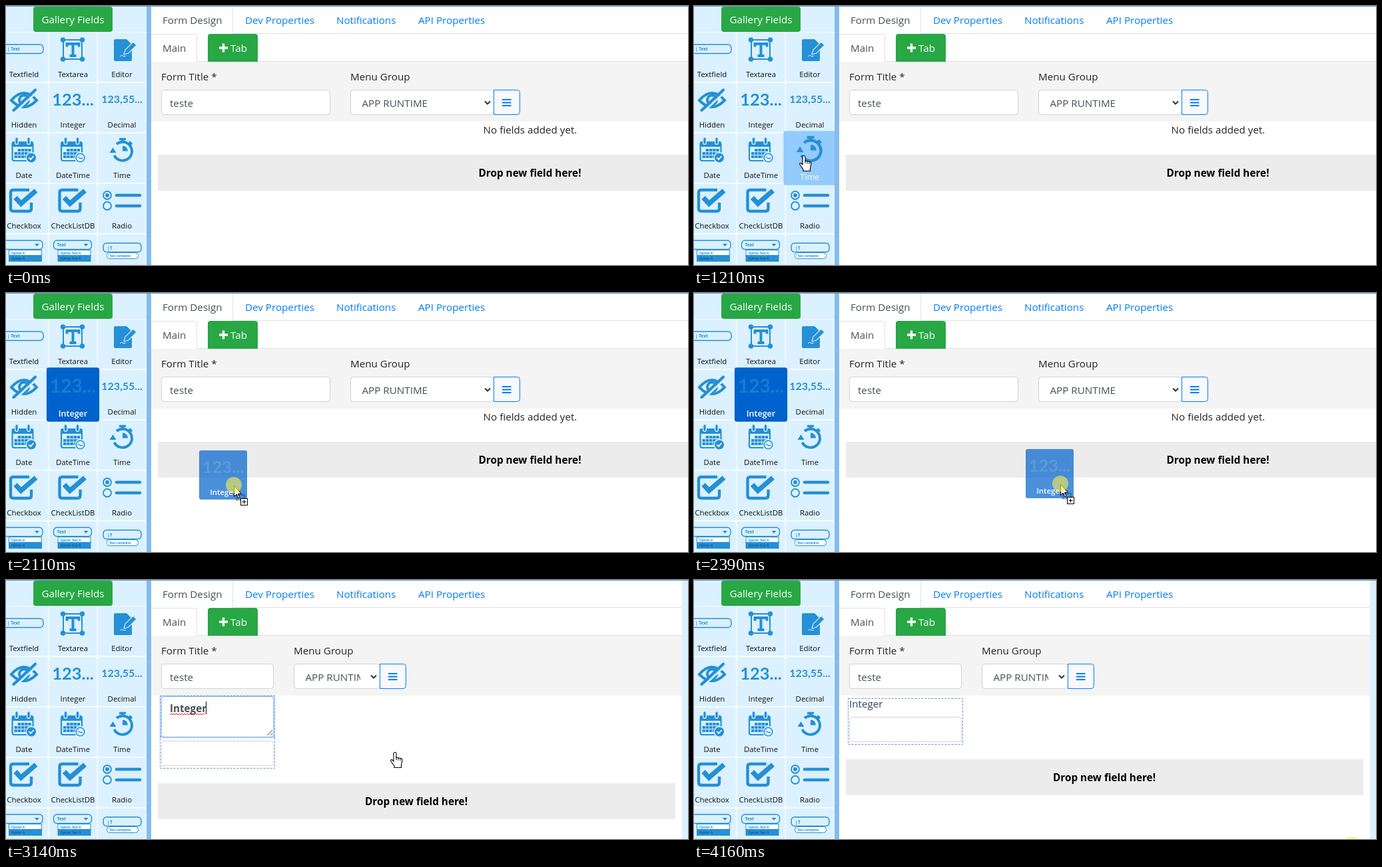
These frames come from a looping animation (1024x390 px, 4290 ms). An HTML page:

```html
<!DOCTYPE html>
<html lang="en">
<head>
<meta charset="utf-8">
<title>Form designer</title>
<style>
html, body { margin: 0; height: 100%; overflow: hidden; background: #fff; }
svg { display: block; width: 100vw; height: 100vh; font-family: "Open Sans", "Noto Sans", sans-serif; }
</style>
</head>
<body>
<svg id="stage" viewBox="0 0 1024 390"></svg>
<script>
const LOOP = 4290, BLUE = '#2590d6', GREEN = '#28a745', LINK = '#007bff', INK = '#212529', GREY = '#495057', SKY = '#dbf1ff';
const stage = document.getElementById('stage');

const rect = (x, y, w, h, fill, more = '') =>
  `<rect x="${x}" y="${y}" width="${w}" height="${h}" fill="${fill}" ${more}/>`;
const text = (x, y, s, fill = INK, size = 15.2, more = '') =>
  `<text x="${x}" y="${y}" fill="${fill}" font-size="${size}" ${more}>${s}</text>`;
const path = (d, stroke, width = 1, fill = 'none', more = '') =>
  `<path d="${d}" stroke="${stroke}" stroke-width="${width}" fill="${fill}" ${more}/>`;
const disc = (x, y, r, fill, more = '') => `<circle cx="${x}" cy="${y}" r="${r}" fill="${fill}" ${more}/>`;
const move = (x, y, body) => `<g transform="translate(${x} ${y})">${body}</g>`;
const box = (x, y, w, h, stroke = '#ced4da', fill = '#fff', more = 'rx="4"') =>
  rect(x + .5, y + .5, w - 1, h - 1, fill, `stroke="${stroke}" ${more}`);
const MID = 'text-anchor="middle"', BOLD = 'font-weight="700"', ROUND = 'stroke-linecap="round"';

// Icons are drawn relative to the top left corner of a 72 x 74 tile
const pill = (x, y, w) => rect(x, y, w, 13.5, 'none', `rx="5" stroke="${BLUE}" stroke-width="1.4"`);
const tiny = (x, y, s, fill = BLUE, size = 4.6) => text(x, y, s, fill, size, BOLD);
const digits = (s, y, size) => text(36, y, s, BLUE, size, `${MID} ${BOLD} font-family="Lato, sans-serif"`);

function calendar(badge) {
  let s = rect(18.5, 13, 31, 28, 'none', `rx="3" stroke="${BLUE}" stroke-width="2.2"`) +
    rect(18, 12, 32, 8, BLUE, 'rx="2"') +
    path('M25 8V14M43 8V14', SKY, 6, 'none', ROUND) + path('M25 8V14M43 8V14', BLUE, 3.4, 'none', ROUND);
  for (let i = 1; i < 14; i++) s += rect(21.5 + i % 5 * 5.2, 23 + (i / 5 | 0) * 5, 4.4, 4, BLUE);
  return s + disc(47, 36.500, 8.5, SKY) + (badge === 'check'
    ? disc(47, 36.500, 7, BLUE) + path('M43.500 36.500l2.500 2.500 4.500-5', '#fff', 1.8)
    : disc(47, 36.500, 6.3, SKY, `stroke="${BLUE}" stroke-width="1.6"`) + path('M43.500 35.500l4 2h3', BLUE, 1.3));
}
const checkbox = () =>
  path('M44 9H20Q16 9 16 13V37Q16 41 20 41H43Q47 41 47 37V28', BLUE, 4.4) +
  path('M23 20.500l8.500 9L54 10', BLUE, 7.5);
const option = y => disc(14, y, 6, 'none', `stroke="${BLUE}" stroke-width="1.8"`) +
  path(`M28 ${y}H63`, BLUE, 4.6, 'none', ROUND);
const dropdown = (x, w, label, item) => pill(x, 9, w) + tiny(12, 18, label, BLUE, 6.5) +
  path('M52 14h7l-3.500 4z', 'none', 0, BLUE) + box(13, 23, 50, 10, BLUE, '#fff', '') +
  rect(13, 31, 50, 10, BLUE) + tiny(17, 29.5, item) + tiny(17, 38, item, '#135a94');

const TILES = [
  ['Textfield', () => pill(-3, 18, 68) + tiny(11, 27, '| Text', BLUE, 6.5)],
  ['Textarea', () => rect(21.5, 11, 28, 29, 'none', `stroke="${BLUE}" stroke-width="2"`) +
    [[21, 11], [50, 11], [21, 40], [50, 40]].map(p => disc(...p, 3.8, BLUE)).join('') +
    path('M27 21.500V17H45V21.500M36 17V35M31 35H41', BLUE, 4)],
  ['Editor', () => path('M26 10H43L51 18V41Q51 43 49 43H26Q24 43 24 41V12Q24 10 26 10Z', 'none', 0, BLUE) +
    path('M39 33l2-7L53 14l5 5L46 31Z', SKY, 1.1, BLUE) + path('M33 36l3-2 2 2 4-1', SKY, 1)],
  ['Hidden', () => path('M17 26Q36 4 55 26Q36 46 17 26Z', BLUE, 4) +
    disc(36, 25.5, 7, 'none', `stroke="${BLUE}" stroke-width="4"`) +
    path('M23 43.500L56 13', SKY, 3) + path('M20.500 41L53 10.500', BLUE, 4.4, 'none', ROUND)],
  ['Integer', () => digits('123...', 34, 25.5)],
  ['Decimal', () => digits('123,55...', 30, 16)],
  ['Date', () => calendar('check')],
  ['DateTime', () => calendar('clock')],
  ['Time', () => path('M24.500 33A14 14 0 1 0 28 16', BLUE, 4) + path('M17.500 29h10l-5-8z', 'none', 0, BLUE) +
    path('M32 8.500H42M37 8V13M47 12.500l4 4', BLUE, 3.6) + path('M37 26.500V18.500A8 8 0 0 1 45 26.500Z', 'none', 0, BLUE)],
  ['Checkbox', checkbox],
  ['CheckListDB', checkbox],
  ['Radio', () => option(17) + option(33) + disc(14, 17, 3, BLUE)],
  ['', () => dropdown(-3, 67, '', 'Option A')],
  ['', () => dropdown(7, 57, 'Text', 'Option Text A')],
  ['', () => pill(8, 13, 57) + tiny(14, 23, '|T', BLUE, 7) + box(13, 27, 48, 10, BLUE, '#fff') + tiny(17, 34, 'Text complete')]
];
const FILL = { idle: SKY, hover: '#93cbfd', active: '#0062cc' };

function tileBody(i, mode) {
  const [name, icon] = TILES[i];
  return rect(0, 0, 72, 74, FILL[mode], 'rx="3"') +
    `<g opacity="${mode === 'active' ? .6 : 1}">${icon()}</g>` +
    text(36, 67, name, mode === 'idle' ? '#111' : '#fff', 11.4, MID + (mode === 'active' ? ' font-weight="600"' : ''));
}
function tile(i, mode = 'idle') {
  const x = -9 + i % 3 * 73.5, y = 40 + (i / 3 | 0) * 76;
  return move(x, y, mode === 'idle' ? tileBody(i, mode)
    : `<g transform="translate(-3.6 -3.7) scale(1.1)">${tileBody(i, mode)}</g>`);
}

function sidebar(hot, mode) {
  let s = rect(0, 0, 211, 390, SKY) + rect(0, 39, 211, 351, '#f6fcff');
  TILES.forEach((_, i) => { if (i !== hot) s += tile(i); });
  if (hot >= 0) s += tile(hot, mode);
  return s + rect(211, 0, 7, 390, '#85bcea') +
    rect(41, 1, 119, 38, GREEN, 'rx="4"') + text(100.5, 26, 'Gallery Fields', '#fff', 15.2, MID);
}

function header(narrow) {
  const right = narrow ? 1015 : 1024, inputW = narrow ? 169 : 254;
  const menu = narrow ? 432 : 517, selW = narrow ? 130 : 216, end = menu + selW - 1;
  return rect(218, 84, right - 218, 90, '#f4f4f4') +
    path(`M340.500 1V41.500H${right}M286.500 83.500V45Q286.500 42.500 283 42.500H218M286.500 83.500H${right}`, '#dee2e6') +
    text(235, 27, 'Form Design', GREY) + text(359, 27, 'Dev Properties', LINK) +
    text(496, 27, 'Notifications', LINK) + text(619, 27, 'API Properties', LINK) +
    text(235, 69, 'Main', GREY) +
    path('M303 84V46Q303 42 307 42H374Q378 42 378 46V84Z', 'none', 0, GREEN) +
    path('M320 63H333M326.500 56.500V69.500', '#fff', 3.4) + text(337, 69, 'Tab', '#fff') +
    text(233, 112, 'Form Title *') + box(233, 126, inputW, 38) + text(246, 152, 'teste', GREY) +
    text(menu, 112, 'Menu Group') + box(menu, 126, selW, 38) +
    `<clipPath id="sel"><rect x="${menu}" y="126" width="${selW - 30}" height="38"/></clipPath>` +
    text(menu + 17.5, 152, 'APP RUNTIME', GREY, 15.2, 'clip-path="url(#sel)"') +
    path(`M${end - 13} 143.500l4 4 4-4`, '#333', 2) +
    path(`M${end + .5} 126.500h35q4 0 4 4v29q0 4-4 4h-35z`, LINK, 1, '#f8f9fa') +
    path([141, 145.5, 150].map(y => `M${end + 13} ${y}h13.500`).join(''), LINK, 2);
}

const dropBar = (y, right, mid) => rect(228, y, right - 228, 54, '#ececec') +
  text(mid, y + 33, 'Drop new field here!', '#000', 15.3, `${MID} ${BOLD}`);
const dashed = (y, h) => box(231, y, 173, h, '#6c8fd0', 'none', 'stroke-dasharray="3 2"');

function editing() {
  return rect(231, 173.5, 173, 65, '#cfe5ff', 'rx="4"') + box(233, 175, 169, 62, '#80bdff') +
    dashed(174, 110) + path('M231 236.500H404', '#6c9fd8', 1, 'none', 'stroke-dasharray="3 2"') +
    text(246, 199, 'Integer', GREY, 15.2, BOLD) + path('M246 203' + 'l2-2 2 2'.repeat(13), '#e22', 1) +
    path('M300.500 183V202', '#000') + path('M392 234l8-8M397 234l3-3', '#555') +
    box(233, 242, 169, 38) + dropBar(306, 1005, 616);
}
const added = () => box(233, 206, 169, 38) + dashed(178, 70) +
  text(233, 192, 'Integer', '#35425e') + dropBar(270, 1005, 616);

// Pointer: [ms, x, y]
const ROUTE = [
  [380, 729, 315], [588, 460, 213], [657, 390, 193], [727, 338, 185], [796, 290, 186], [865, 223, 204],
  [1000, 185, 228], [1212, 165, 225], [1420, 100, 163], [1490, 99, 159], [1690, 99, 159],
  [1830, 117, 169], [1905, 160, 195], [1974, 226, 237], [2043, 283, 268], [2113, 342, 290],
  [2182, 405, 302], [2251, 460, 303], [2320, 510, 298], [2390, 550, 288], [2460, 578, 274],
  [2529, 592, 266], [2605, 592, 264], [2870, 584, 259], [3430, 584, 259], [3500, 640, 300], [3570, 817, 371]
];
function pointer(t) {
  const i = ROUTE.findIndex(k => k[0] > t);
  if (i < 1) return ROUTE[i ? ROUTE.length - 1 : 0].slice(1);
  const [a, b] = [ROUTE[i - 1], ROUTE[i]], p = (t - a[0]) / (b[0] - a[0]);
  return [1, 2].map(j => Math.round(a[j] + (b[j] - a[j]) * p));
}
const sample = t => 380 + Math.floor((t - 374) / 69.3) * 69.3;

const arrow = path('M.5.500V16.500L4.200 13L7 19L9.200 18L6.500 12.300H11.500Z', '#000', 1, '#fff');
const hand = path('M-2 2Q-2 .5 0 .5T2 2V8L9 9.500Q11 10 11 13L9.500 19V23.500H-1V21L-6 14Q-7 11 -4.500 11.500L-2 14Z', '#000', 1.1, '#fff') +
  path('M2 7V12M5 9V12.500M8 10V13', '#000', 1);
const copyBadge = rect(4, 14, 12, 8, 'none', 'stroke="#000" stroke-dasharray="1 1"') +
  box(10, 19, 11, 11, '#000', '#fff', '') + path('M12.500 24.500h6M15.500 21.500v6', '#000');
const press = (x, y) => disc(x, y, 12, '#ffec4a', 'opacity=".6"');

function cursor(t) {
  if (t < 380 || t >= 3640) return '';
  const [x, y] = pointer(sample(t));
  const held = t >= 1755 && t < 2670, dragging = t >= 1825 && held;
  const pointing = t >= 1000 && !dragging && t < 3500;
  return (dragging ? `<g opacity=".7">${move(x - 52, y - 53, tileBody(4, 'active'))}</g>` : '') +
    move(x, y, pointing ? hand : arrow + (dragging ? copyBadge : '')) + (held ? press(x, y - 1) : '');
}

function frame(t) {
  const placed = t >= 3070;
  let hot = -1, mode = 'hover';
  if (t >= 1000 && t < 1275) hot = 8;
  else if (t >= 1275 && !placed) hot = 4;
  if (t >= 1755) mode = 'active';
  let s = rect(0, 0, 1024, 390, '#fff') + sidebar(hot, mode) + header(placed);
  if (!placed) s += text(787, 192, 'No fields added yet.', INK, 15.2, MID) + dropBar(224, 1024, 786.5);
  else s += rect(1015, 0, 9, 390, SKY) + (t < 4160 ? editing() : added() + press(987, 398));
  return s + rect(0, 0, 1024, 1, '#5b9fd8') + cursor(t);
}

let last = '';
function play(now) {
  const next = frame(now % LOOP);
  if (next !== last) stage.innerHTML = last = next;
  requestAnimationFrame(play);
}
play(performance.now());
</script>
</body>
</html>
```
